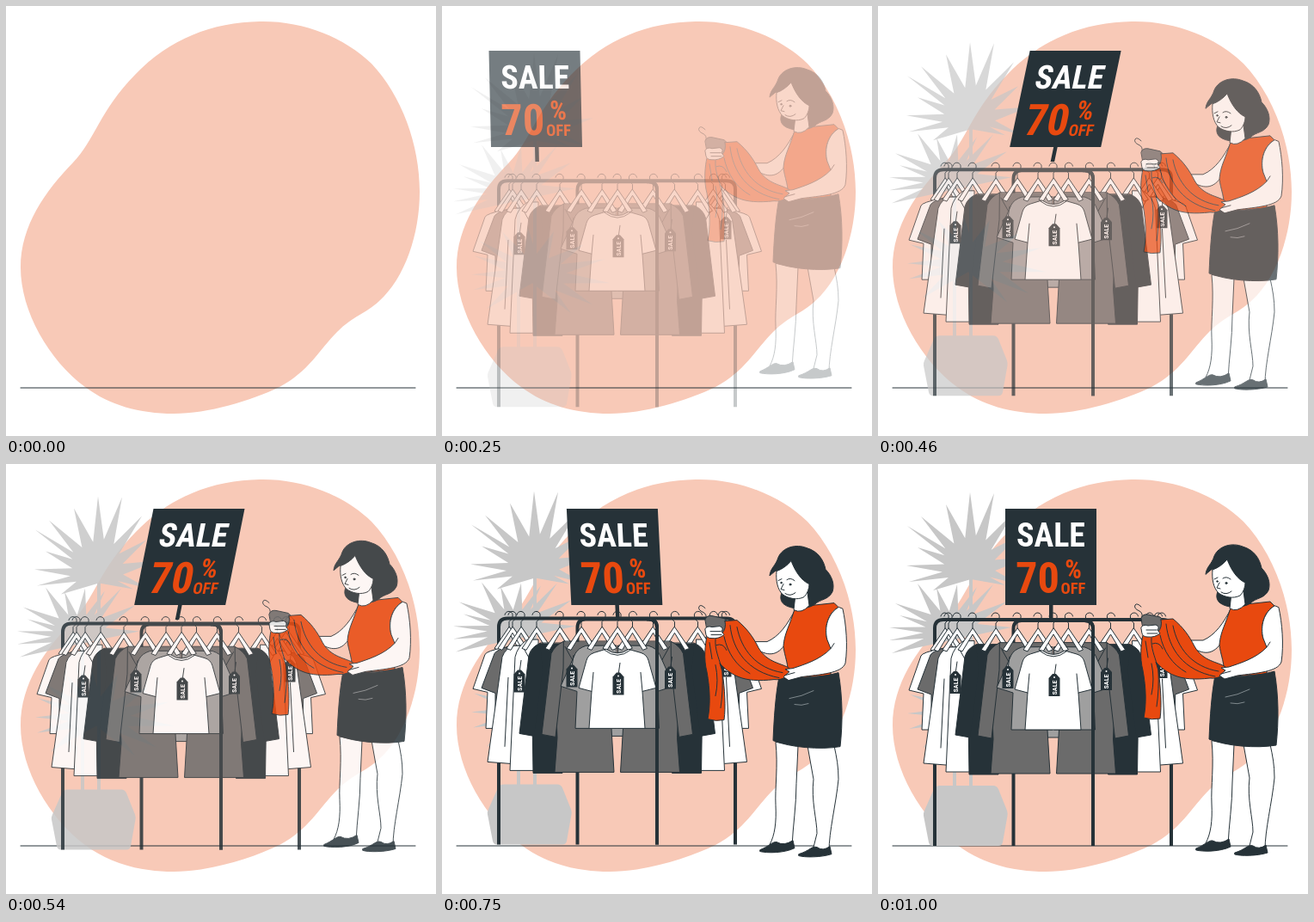
Write an HTML page that moves like this. It is 500 px wide and 500 px high and loops after 1.04 s.

```html
<!DOCTYPE html>
<html lang="en">
<head>
<meta charset="utf-8">
<title>Clothes sale</title>
<style>
  html, body { margin: 0; width: 100%; height: 100%; overflow: hidden; background: #fff; }
  svg { display: block; width: 100%; height: 100%; }
  .ink { stroke: #263238; stroke-width: 1; stroke-linejoin: round; stroke-linecap: round; }
  .line { fill: none; }
  .bar { fill: none; stroke: #263238; stroke-width: 4; }
  .white { fill: #fff; }
  .dark { fill: #263238; }
  .gray { fill: #6b6b6b; }
  .pale { fill: #9f9f9f; }
  .orange { fill: #e8490f; }
  .leaf { fill: #c7c7c7; }
  text {
    font-family: "Roboto Condensed", "Open Sans Condensed", Roboto, "Noto Sans", sans-serif;
    font-weight: 700; font-stretch: condensed; font-size: 20px; text-anchor: middle;
  }
</style>
</head>
<body>
<svg viewBox="0 0 500 500">
  <path fill="#f8c9b7" d="M295 18C345 17 393 36 425 67C460 104 481 161 481 216C481 265 464 316 434 343C418 358 404 360 385 379C364 400 352 425 318 443C285 459 235 474 195 474C155 474 120 464 92 443C50 412 17 355 17 304C17 255 46 215 78 182C102 158 110 120 150 80C190 38 240 19 295 18Z"/>
  <path class="ink line" d="M17 444H476"/>

  <g id="plant" opacity="0">
    <path d="M89 195V376M108 125V376" fill="none" stroke="#c7c7c7" stroke-width="4"/>
    <g id="fans" class="leaf"></g>
    <path class="leaf" d="M72 374H134Q138 374 140 378L150 403Q151 406 150.500 409L145 440Q144 444 140 444H64Q60 444 59 440L53 409Q52.500 406 54 403L65 378Q67 374 72 374Z"/>
  </g>

  <g id="sign" opacity="0">
    <path class="dark" d="M199 163H203.500V181H199ZM148 52H254V164H148Z"/>
    <text class="white" data-box="201 82.500 80 33">SALE</text>
    <text class="orange" data-box="185.500 132 51 44">70</text>
    <text class="orange" data-box="227 121.500 25 22">%</text>
    <text class="orange" data-box="227 144 29 18">OFF</text>
  </g>

  <g id="rack" opacity="0">
    <path class="bar" d="M66 444V191Q66 181 76 181H331Q341 181 341 191V444"/>
    <path class="bar" d="M157.500 444V192Q157.500 182 167 182H240Q250 182 250 192V444"/>
    <path class="ink pale" d="M196 300H212L211 318H197Z"/>
    <g id="half"></g>
    <use href="#half" transform="translate(407.500) scale(-1 1)"/>
    <g id="front"></g>
    <path class="bar" d="M238 182H240Q250 182 250 192V444"/>
    <g id="tags"></g>
  </g>

  <g id="woman" opacity="0" class="ink">
    <g class="white">
      <path d="M388 322C391 350 387 375 388 395C389 415 387 430 381 441L407 443C408 420 412 395 412 370L414 326Z"/>
      <path d="M425 326L432 365C429 390 436 412 436 428L431 448L450 449C450 425 458 395 461 365C461 350 459 340 456 326Z"/>
    </g>
    <path class="dark" d="M370 447C380 443 385 437 389 438Q398 443 408 436L410 445C398 451 378 451 370 449Z"/>
    <path class="dark" d="M415 452C428 448 430 442 436 444Q443 449 451 443L453 452C441 456 421 456 415 454Z"/>
    <path class="white" d="M411 167C402 185 392 199 378 205L360 205L366 214C381 223 391 220 399 208Z"/>
    <path class="orange" d="M410 167L428 163L456 160L461 165C448 172 444 190 448 203L453 212L452 244L402 248C404 232 398 222 397 210C398 195 405 185 410 167Z"/>
    <path class="dark" d="M392 246C412 249 440 247 461 241C466 270 466 300 463 327C440 331 405 328 385 320C386 295 388 265 392 246Z"/>
    <path class="line" stroke="#7f898d" d="M404 271Q418 269 432 262M410 278Q418 280 426 277"/>
    <path class="dark" d="M381 128C382 119 388 117 391 107C396 95 412 91 424 96C438 100 444 111 446 121C453 128 457 138 454 147C449 157 440 155 433 162C424 168 405 168 397 161C392 156 394 150 396 146L389 122Z"/>
    <path class="white" d="M411 150L409 168Q418 173 427 163L425 148Z"/>
    <path class="white" d="M389 123C388 134 390 144 396 150C403 155 413 157 421 153C425 149 427 143 427 138C418 134 411 124 406 111C401 117 395 121 389 123Z"/>
    <path class="line" d="M401 133Q405 130 410 134M391 134L395 132M397 138L394 144L398 145M399 149Q405 153 411 148"/>
    <circle class="dark" cx="405" cy="138.500" r="1"/>
    <circle class="dark" cx="394.500" cy="136.500" r=".8"/>
    <path class="line" d="M307 178Q308 173 304 171Q297 168 299 164Q301 161 306 166"/>
    <path class="gray" d="M306 179Q308 174 314 175L328 178Q333 181 333 186L328 197L309 195Z"/>
    <path class="orange" d="M329 181L343 180C355 190 362 200 368 212C378 230 396 230 404 236C404 246 396 250 386 249C368 251 355 250 345 246C335 242 328 236 323 230L326 240C329 262 330 280 328 296Q318 298 309 295C312 280 312 262 308 240C304 225 306 208 308 199L325 196Q331 190 329 181Z"/>
    <path class="line" d="M335 186C338 215 355 240 392 247M343 188C348 214 365 236 396 241M328 199C332 218 342 233 358 242M318 202C317 214 322 224 324 232M311 206L314 225M318 232Q322 250 318 268M326 240Q327 262 324 282M319 209Q327 206 331 215"/>
    <path class="white" d="M306 190Q308 186 314 188L323 187Q328 189 325 193L328 197Q322 202 313 201Q308 201 307 197Z"/>
    <path class="line" d="M312 193L324 193M313 197H325"/>
    <path class="white" d="M461 165C449 172 444 188 448 203L452 213C440 226 420 232 408 236L399 237L404 240L397 246L403 250L418 246C440 243 465 242 469 230C472 210 470 185 466 167Z"/>
    <path class="line" d="M452 213L456 207M399 244L410 241"/>
  </g>
</svg>
<script>
const $ = id => document.getElementById(id);
const path = (cls, d) => `<path class="${cls}" d="${d}"/>`;

// Palm fan: spikes from a centre to each tip
function fan(cx, cy, tips) {
  const pts = [[cx, cy + 10]];
  for (let i = 0; i < tips.length; i += 2) {
    const [x, y, nx, ny] = tips.slice(i, i + 4);
    pts.push([x, y]);
    if (ny !== undefined) {
      pts.push([cx + ((x + nx) / 2 - cx) * .45, cy + ((y + ny) / 2 - cy) * .45]);
    }
  }
  return `<polygon points="${pts.join(" ")}"/>`;
}
$("fans").innerHTML =
  fan(108, 124, [64, 147, 36, 137, 33, 118, 46, 97, 34, 72, 50, 61, 79, 47, 107, 33,
    135, 34, 158, 56, 163, 84, 176, 108, 165, 140, 148, 141]) +
  fan(85, 195, [16, 220, 13, 205, 13, 190, 25, 176, 20, 162, 46, 139, 68, 144, 92, 140,
    115, 143, 134, 140, 150, 160, 155, 190]) +
  fan(105, 290, [52, 330, 36, 308, 34, 290, 37, 268, 42, 250, 70, 240, 100, 235,
    130, 240, 165, 255, 190, 272, 196, 300, 175, 325, 150, 335]);

const hanger = x => `<g class="ink" transform="translate(${x} 192)">
  ${path("line", "M-5 -15Q-4 -19 0 -19Q5 -18 4 -13Q3 -9 0 -7V0")}
  ${path("white", "M0 -1L-17 24L-12 26L0 6L12 26L17 24Z")}</g>`;

// Clothes on the left, outermost first; the right side mirrors them
$("half").innerHTML = [
  hanger(78),
  path("ink white", "M72 215Q52 219 50 223L36 263L53 267L51 309H110V215Z"),
  path("ink gray", "M80 213Q64 217 61 222L46 262L62 268V300H110V213Z"),
  hanger(82),
  path("ink white", "M84 213Q74 215 70 226L53 348L79 350H110V213Z"),
  hanger(92),
  path("ink white", "M99 206Q88 213 85 226L79 358H112V206Z"),
  path("ink line", "M95 216L104 232M77 250L73 330"),
  hanger(110),
  path("ink dark", "M114 210L104 228L106 361H140V210Z"),
  path("ink dark", "M114 210Q104 214 101 224L90 315L107 318L117 240Z"),
  hanger(137),
  path("ink gray", "M141 208L130 226L134 320L131 360H200L197 309V208Z"),
  path("ink gray", "M141 208Q131 213 127 222L116 316L132 319L141 240Z"),
  path("ink line", "M143 214L152 230L150 250"),
  hanger(162),
  path("ink pale", "M167 213Q158 216 155 222L138 260L157 266L155 309H203V213Z"),
  hanger(186)
].join("");

$("front").innerHTML = hanger(204) + path("ink white",
  "M191 217Q204 226 217 217L231 221Q238 223 240 230L249 262L233 266L236 309H171L174 266L159 262L168 230Q170 223 177 221Z") +
  path("ink line", "M174 266L176 244M233 266L231 244M189 218Q204 230 219 218");

const tag = (x, y) => `<g transform="translate(${x} ${y})">
  ${path("ink line", "M0 -10L2 -24")}
  ${path("dark", "M-6.500 -8L-2 -13H2L6.500 -8V13H-6.500Z")}
  <circle class="white" cy="-9" r="1"/>
  <g transform="rotate(-90)"><text class="white" data-box="-3 0 17 7.500">SALE</text></g></g>`;
$("tags").innerHTML = tag(90, 254) + tag(151, 248) + tag(205, 257) + tag(265.5, 250) + tag(330, 236);

// Choose the largest size that fits both width and cap height
for (const el of document.querySelectorAll("text")) {
  const [x, mid, w, cap] = el.dataset.box.split(" ").map(Number);
  const size = Math.min(20 * w / el.getComputedTextLength(), cap / .714);
  el.style.fontSize = size + "px";
  el.setAttribute("x", x);
  el.setAttribute("y", mid + size * .357);
}

// cubic-bezier(.36, -.01, .5, 1.38)
const bez = (a, b, u) => 3 * a * u * (1 - u) ** 2 + 3 * b * u * u * (1 - u) + u ** 3;
function ease(x) {
  if (x <= 0 || x >= 1) return x <= 0 ? 0 : 1;
  let lo = 0, hi = 1;
  for (let i = 0; i < 30; i++) {
    const u = (lo + hi) / 2;
    if (bez(.36, .5, u) < x) lo = u; else hi = u;
  }
  return bez(-.01, 1.38, lo);
}

function pose(id, opacity, transform) {
  $(id).setAttribute("opacity", Math.max(0, Math.min(1, opacity)));
  $(id).setAttribute("transform", transform);
}

const LOOP = 1040, FPS = 24, MID = 116;
const tan = deg => Math.tan(deg * Math.PI / 180);

function signPose(p) {
  let dx = 0, skew, alpha = 1;
  const mix = (a, b, e) => tan(a) + (tan(b) - tan(a)) * e;
  if (p < .6) {
    const e = ease(p / .6);
    dx = -250 * (1 - e);
    skew = mix(20, -10, e);
    alpha = e;
  } else if (p < .8) {
    skew = mix(-10, 2, ease((p - .6) / .2));
  } else {
    skew = mix(2, 0, ease((p - .8) / .2));
  }
  pose("sign", alpha, `matrix(1 0 ${skew} 1 ${dx - skew * MID} 0)`);
}

function draw(ms) {
  const step = Math.min(FPS, Math.floor((ms % LOOP + 5) * FPS / 1000));
  const p = step < 2 ? 0 : Math.min(1, step / FPS + .0165);
  const e = ease(p), d = 30 * (1 - e);
  pose("plant", e, `translate(0 ${d})`);
  pose("rack", e, `translate(0 ${d})`);
  pose("woman", e, `translate(0 ${-d})`);
  signPose(p);
}

const start = performance.now();
function tick() {
  draw(performance.now() - start);
  requestAnimationFrame(tick);
}
tick();
</script>
</body>
</html>
```
